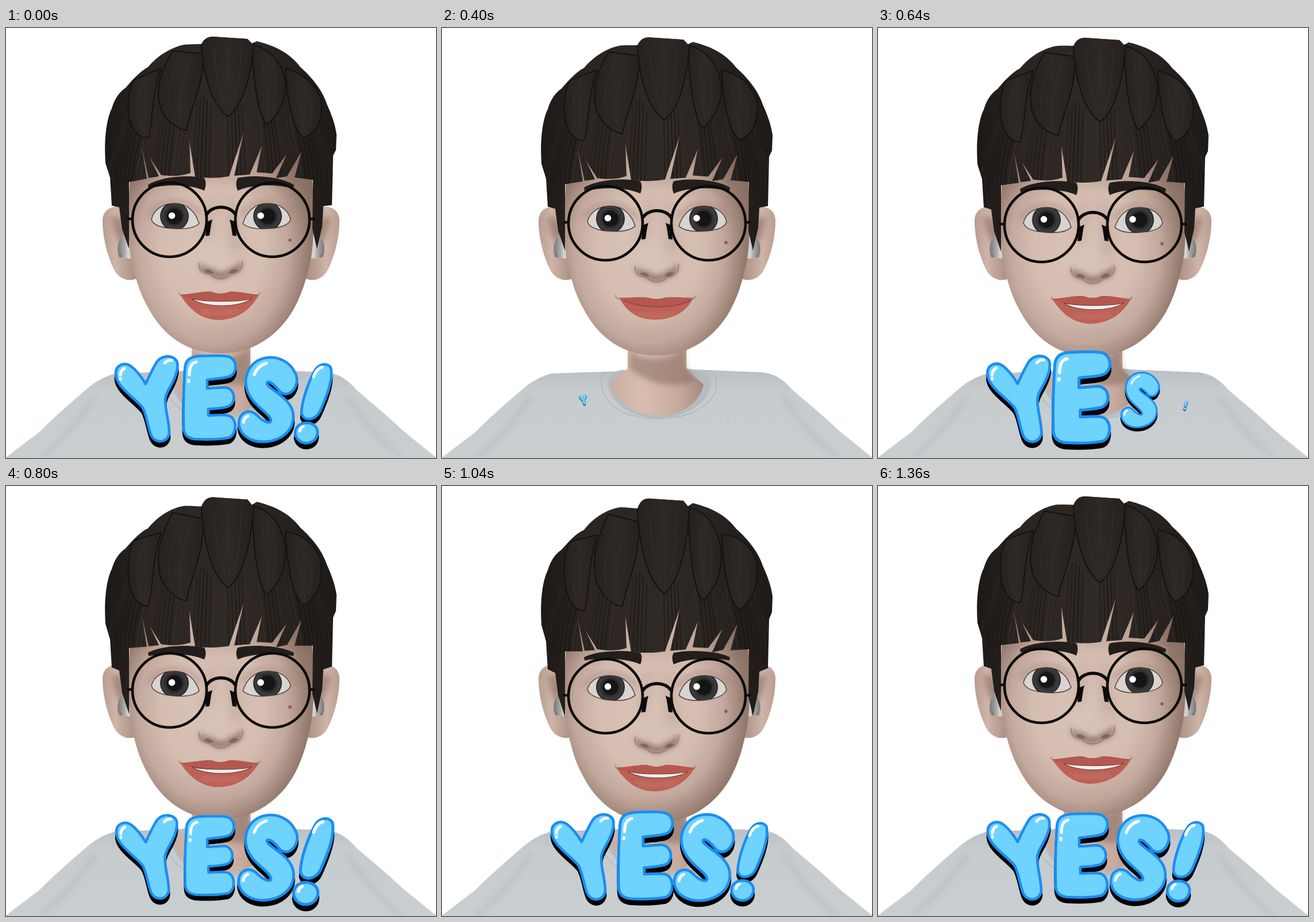
An HTML page that plays this animation: 748 px wide and 748 px high, repeating every 1440 ms.

```html
<!DOCTYPE html>
<html lang="en">
<head>
<meta charset="utf-8">
<title>Yes!</title>
<style>
html, body { margin: 0; width: 100%; height: 100%; overflow: hidden; background: #fff }
svg { display: block; width: 100vw; height: 100vh }
.lock { fill: url(#lockFill); stroke: #15110f; stroke-width: 2; stroke-linejoin: round }
.frame { fill: none; stroke: #0c0b0b; stroke-width: 4.6 }
.letter path { stroke-width: 4.6; stroke-linecap: round; stroke-linejoin: round }
.letter .shine { fill: none; stroke: #fff; stroke-width: 5 }
</style>
</head>
<body>
<svg viewBox="0 0 748 748">
<defs>
  <filter id="soft" x="-50%" y="-50%" width="200%" height="200%"><feGaussianBlur stdDeviation="5"/></filter>
  <filter id="softer" x="-50%" y="-50%" width="200%" height="200%"><feGaussianBlur stdDeviation="10"/></filter>
  <radialGradient id="skin" gradientUnits="userSpaceOnUse" cx="0" cy="0" r="200" gradientTransform="translate(360 385) scale(1 1.250)">
    <stop stop-color="#dac4b8"/><stop offset=".45" stop-color="#d5bdb0"/>
    <stop offset=".65" stop-color="#c3a99d"/><stop offset=".84" stop-color="#94796d"/><stop offset="1" stop-color="#846a5f"/>
  </radialGradient>
  <linearGradient id="earSkin"><stop stop-color="#b89c90"/><stop offset=".35" stop-color="#cfb4a8"/><stop offset="1" stop-color="#a1867a"/></linearGradient>
  <linearGradient id="neckSkin"><stop stop-color="#c9aea2"/><stop offset=".35" stop-color="#d8beb1"/><stop offset=".75" stop-color="#c6a99c"/><stop offset="1" stop-color="#a4887b"/></linearGradient>
  <linearGradient id="cloth" x2="0" y2="1"><stop stop-color="#b9bfc3"/><stop offset=".25" stop-color="#c6cbce"/><stop offset="1" stop-color="#c9ced1"/></linearGradient>
  <linearGradient id="budFill"><stop stop-color="#777"/><stop offset=".4" stop-color="#aaa"/><stop offset=".6" stop-color="#d6d5d2"/><stop offset="1" stop-color="#c0bfbd"/></linearGradient>
  <linearGradient id="hairFill"><stop stop-color="#1d1916"/><stop offset=".2" stop-color="#2b2522"/><stop offset=".55" stop-color="#302a26"/><stop offset="1" stop-color="#1e1a17"/></linearGradient>
  <linearGradient id="lockFill"><stop stop-color="#26211e"/><stop offset=".5" stop-color="#2f2926"/><stop offset="1" stop-color="#26211e"/></linearGradient>
  <radialGradient id="irisFill"><stop offset=".5" stop-color="#151516"/><stop offset=".6" stop-color="#2d2d2f"/><stop offset=".85" stop-color="#3e3e40"/><stop offset="1" stop-color="#232324"/></radialGradient>
</defs>

<g id="body">
  <path fill="url(#cloth)" d="M0 747L58 703C85 676 110 654 138 630C155 615 170 607 190 601L310 597L438 594L558 599C578 602 592 609 610 630C638 654 663 674 690 700L748 747V748H0Z"/>
  <g fill="none" stroke="#8f989e" stroke-width="10" opacity=".18" filter="url(#soft)">
    <path d="M60 748C100 715 130 680 155 640M688 748C648 715 618 680 593 640"/>
  </g>
  <path fill="#b5bbbf" d="M312 595C295 598 287 608 289 622C294 655 335 679 376 679C425 678 465 652 468 618C468 605 455 598 432 593Z"/>
  <path fill="none" stroke="#a9b0b5" stroke-width="1.2" d="M286 600C270 606 276 640 300 660C345 690 440 688 472 640Q482 620 474 603"/>
  <path fill="url(#neckSkin)" d="M323 535V592C318 602 296 606 293 617C297 647 332 674 375 674C424 674 450 647 455 620C446 610 430 603 425 590V535Z"/>
  <path fill="#80665a" opacity=".5" filter="url(#soft)" d="M327 562C350 580 400 582 422 556L424 590L442 612C410 630 355 620 327 592Z"/>
</g>

<g id="side">
  <path fill="url(#earSkin)" d="M204 313C188 307 168 314 168 335C168 368 178 402 190 424C200 438 215 442 229 435L232 350Z"/>
  <path fill="#8d7165" opacity=".6" filter="url(#soft)" d="M184 328C200 326 208 340 210 362L196 372C188 355 184 342 184 328Z"/>
  <path fill="url(#budFill)" d="M211 357C193 362 192 388 197 399L224 402L220 362Z"/>
  <path stroke="#77736f" stroke-width="2" d="M199 393L200 399"/>
</g>
<use href="#side" transform="matrix(-1 0 0 1 748 0)"/>

<g id="head">
  <path fill="url(#skin)" d="M222 180C211 290 211 370 218 403C225 436 233 462 248 488C263 516 285 540 315 554C350 570 398 570 431 554C462 540 486 515 501 488C515 462 523 436 530 403C537 370 538 290 526 180Z"/>
  <g filter="url(#softer)" fill="#8b6c60">
    <path opacity=".22" d="M215 250L535 250L535 274C440 266 300 266 215 274Z"/>
    <path opacity=".3" d="M358 290C348 330 350 345 340 372L356 366L366 300Z"/>
    <path opacity=".35" d="M392 290C400 330 402 350 410 390L394 386L386 300Z"/>
    <path opacity=".3" d="M338 520C360 530 395 530 412 518L400 530L350 532Z"/>
  </g>

  <g id="nose">
    <path filter="url(#soft)" fill="#7c5f54" opacity=".75" d="M336 408C333 424 346 427 356 429C367 440 382 438 391 429C405 427 414 420 410 403C402 418 390 414 384 423C374 426 364 424 358 418C350 416 342 417 336 408Z"/>
    <path fill="none" stroke="#80645a" stroke-width="2" opacity=".5" d="M336 409C334 423 345 427 355 428C366 440 384 438 392 428C405 426 414 418 411 405"/>
    <path fill="#654a41" opacity=".55" d="M344 422C350 418 357 420 361 427C354 427 348 426 344 422ZM387 427C391 419 399 418 404 421C400 426 394 427 387 427Z"/>
  </g>

  <clipPath id="eyeClip"><path id="eye" data-by="blink" d="M253 333C257 315 274 305 294 305C316 305 330 321 336 340C328 348 310 350 293 349C272 348 256 343 253 333Z" data-alt="M253 333C262 341 280 348 296 348C316 348 330 345 336 340C328 348 310 350 293 349C272 348 256 343 253 333Z"/></clipPath>
  <g id="eyeball">
    <path filter="url(#soft)" fill="none" stroke="#a3857a" stroke-width="8" opacity=".5" d="M247 327C258 302 310 285 338 325"/>
    <use href="#eye" fill="#d8d4d1" stroke="#5d4a42" stroke-width="1.6"/>
    <g clip-path="url(#eyeClip)"><g class="iris">
      <circle cx="293" cy="327.500" r="25" fill="url(#irisFill)"/>
    </g></g>
  </g>
  <use href="#eyeball" transform="matrix(-1 0 0 1 748 0)"/>
  <g class="iris" fill="#fff"><circle cx="288.500" cy="326.500" r="5.800"/><circle cx="443" cy="326.500" r="5.800"/></g>

  <path id="brow" fill="#231e1b" d="M247 273C270 258 320 255 345 261Q350 270 345 283C325 273 285 270 248 279Z"/>
  <use href="#brow" transform="matrix(-1 0 0 1 748 0)"/>
  <path fill="#806659" d="M491 369C491 365 497 365 497 369C497 373 491 373 491 369Z"/>

  <g id="mouth">
    <path fill="none" stroke="#94766a" stroke-width="3" opacity=".5" d="M301 460Q303 465 308 467M442 460Q440 465 435 467"/>
    <path fill="#bd6157" data-by="calm" d="M303 464C325 463 345 457 358 459C368 463 378 463 388 459C402 457 420 463 440 464C425 492 400 508 368 508C338 507 318 488 303 464Z" data-alt="M308 465C328 464 345 463 358 464C368 467 378 467 388 464C402 463 420 464 437 465C425 490 402 503 370 503C338 503 322 488 308 465Z"/>
    <path fill="#b45850" data-by="calm" d="M303 464C325 463 345 457 358 459C368 463 378 463 388 459C402 457 420 463 440 464C415 478 330 480 303 464Z" data-alt="M308 465C328 464 345 463 358 464C368 467 378 467 388 464C402 463 420 464 437 465C415 484 330 484 308 465Z"/>
    <path fill="#f1eeea" stroke="#79403a" stroke-width="1.200" data-by="calm" d="M323 471C345 477 405 477 428 471C405 487 345 487 323 471Z" data-alt="M316 469C345 484 405 484 433 469C405 484 345 484 316 469Z"/>
    <path filter="url(#soft)" fill="none" stroke="#d88a7e" stroke-width="5" opacity=".5" d="M338 492Q370 502 405 491"/>
  </g>

  <clipPath id="hairClip"><use href="#hair"/></clipPath>
  <path id="hair" fill="url(#hairFill)" d="M173 235C170 190 176 155 184 140C188 125 196 112 208 104C220 90 235 74 247 68C262 50 285 34 310 29C322 28 332 28 340 28C345 18 352 15 360 15L420 19L428 27L436 23C470 31 495 45 512 68C535 88 552 112 558 132C566 150 572 165 575 185L574 212L569 222L567 308L552 310L550 345L541 384L533 350L534 264L502 260L514 215L489 258L470 261L488 220L463 253L436 251L445 205L424 255L397 257L414 180L388 258C365 262 350 261 329 259L319 196L321 252C305 258 290 258 270 256L250 225L266 258L248 261L236 206L245 262L214 268L214 384L202 350L197 312L184 309L181 260L173 235Z"/>
  <g clip-path="url(#hairClip)">
    <g id="strands" fill="none" stroke-width="2"></g>
    <path class="lock" d="M222 90C208 120 210 160 224 179C232 189 240 192 248 190C256 165 252 120 270 70Z"/>
    <path class="lock" d="M486 70C490 130 500 175 517 190C540 184 552 160 548 125C540 100 520 80 486 70Z"/>
    <path class="lock" d="M290 40C262 85 262 115 269 140C280 165 300 176 314 178C318 145 342 110 344 45Z"/>
    <path class="lock" d="M428 28C430 100 440 152 453 168C475 152 488 125 486 95C480 55 455 35 428 28Z"/>
    <path class="lock" d="M339 24C344 90 360 135 386 154C410 138 426 90 431 25L420 16L352 12Z"/>
    <g fill="none" stroke="#3b342f" stroke-width="2" opacity=".5">
      <path d="M362 35C364 80 372 115 382 138M385 30C388 70 390 110 389 138M408 32C410 75 402 115 394 135"/>
      <path d="M300 58C282 95 280 125 287 148M323 50C304 95 300 130 303 160M446 55C452 95 455 130 456 150M464 62C472 95 470 125 463 145"/>
      <path d="M235 100C225 130 228 155 235 175M505 100C512 140 515 165 520 178M525 112C535 140 533 160 526 175"/>
    </g>
  </g>
</g>

<g id="glasses" class="frame">
  <circle cx="284.500" cy="333.500" r="64.500"/><circle cx="463.500" cy="333.500" r="64.500"/>
  <path d="M211 332H220M528 332H537"/>
  <path stroke-width="5.500" d="M348 326C358 307 390 307 400 326"/>
  <path fill="#0c0b0b" stroke="none" d="M347 338L359 333L357 341L354 361L347 362L349 343ZM401 338L389 333L391 341L394 361L401 362L399 343Z"/>
</g>
<g id="word"></g>
</svg>

<script>
const STEP = 80, STEPS = 18;
const $ = id => document.getElementById(id);

// One value per step: downward nod in px, closed mouth, closed eyes.
const nod  = [0, 3, 5, 6, 6, 6, 1, -6, 9, 33, 22, -6, 10, 32, 15, 0, 8, 14];
const calm = [0, .1, .4, .7, 1, 1, .7, .25];
const blink = { 14: .6, 15: .25 };
const pop = [.12, .65, 1.09, 1.01, .94, .98, 1.02, 1.04];

// Each letter: centre, outline, highlights.
const letters = [
  [245, 647, "M191 602C190 587 205 580 217 588C228 596 235 606 243 619C249 606 255 592 263 580C272 569 289 568 297 579C301 590 296 604 290 616C284 628 277 637 277 648C277 666 284 685 284 704C282 722 259 725 252 707C246 691 245 675 238 661C228 646 191 625 191 602Z",
    "M199 604Q199 596 206 592M276 583Q281 577 288 578M199 610V611"],
  [354, 645, "M311 596C311 579 318 573 333 571C350 570 370 569 384 571C404 574 404 603 386 607C374 610 362 610 350 612L350 627L380 625C400 626 402 655 384 659C373 662 362 662 352 663L352 674C364 674 376 672 386 674C404 678 402 710 386 713C368 716 345 716 328 715C314 713 308 706 309 690C308 660 309 630 311 596Z",
    "M319 603Q319 583 331 581M318 613V615"],
  [457, 648, "M503 600C514 618 494 648 476 632C468 622 458 612 454 617C452 628 500 642 500 676C499 728 412 735 405 690C404 668 424 661 436 673C446 684 460 690 461 683C460 668 418 654 417 616C418 565 484 559 503 600Z",
    "M432 603Q437 588 453 583M413 686Q414 678 421 675"],
  [535, 657, "M536 598C543 584 558 581 565 591C570 612 556 645 546 667C539 682 518 686 514 670C514 650 526 616 536 598ZM503 705C503 680 543 682 542 704C540 728 506 728 503 705Z",
    "M535 607Q540 592 550 590M511 701Q512 695 517 693"]
];

$("word").innerHTML = letters.map(([, , d, shine]) => `<g class="letter">
  <path d="${d}" stroke="#000" transform="translate(0 8.5)"/>
  <path d="${d}" fill="#6fd3ff" stroke="#1b8df2"/>
  <path class="shine" d="${shine}"/></g>`).join("");

// Fine hair strands fanning out toward the fringe.
let strands = "";
for (let x = 178; x < 572; x += 7) {
  const wave = Math.sin(x * 1.7), from = 374 + (x - 374) * .86, top = 140 + 22 * wave;
  strands += `<path stroke="${wave > 0 ? "#413933" : "#12100d"}" opacity="${(.35 + .2 * Math.cos(x)).toFixed(2)}" d="M${from} ${top}C${from} ${top + 40} ${x} 215 ${x} 275"/>`;
}
$("strands").innerHTML = strands;

const profile = [[0, 1.05], [150, 1.05], [260, .92], [330, .72], [430, .9], [485, .77], [565, .6], [800, .6]];

// How strongly a point follows the nod: by height, fading toward the head's rim.
function follow(x, y) {
  const i = profile.findIndex(p => p[0] > y), [y0, a] = profile[i - 1], [y1, b] = profile[i];
  const rim = Math.min(1, Math.hypot((x - 374) / 203, Math.max(0, 235 - y) / 220));
  return (a + (b - a) * (y - y0) / (y1 - y0)) * (1 - .8 * rim ** 4);
}

const numbers = d => d.match(/[\d.]+/g).map(Number);
const parts = [...document.querySelectorAll("#head path")].map(el => {
  const d = el.getAttribute("d");
  return { el, d, base: numbers(d), alt: numbers(el.dataset.alt || d), by: el.dataset.by };
});

function draw(step) {
  const dy = nod[step], pose = { calm: calm[step] || 0, blink: blink[step] || 0 };
  for (const { el, d, base, alt, by } of parts) {
    const mix = pose[by] || 0, p = base.map((v, i) => v + (alt[i] - v) * mix);
    let i = 0;
    el.setAttribute("d", d.replace(/[\d.]+/g, () => {
      const v = p[i], out = i % 2 ? v + dy * follow(p[i - 1], v) : v;
      i++;
      return out.toFixed(2) + " ";
    }));
  }
  document.querySelectorAll(".iris").forEach(g => g.setAttribute("transform", `translate(0 ${dy * .7})`));
  $("glasses").setAttribute("transform", `translate(0 ${dy})`);
  [...$("word").children].forEach((g, i) => {
    const age = step < 4 ? 99 : step - 5 - i, [x, y] = letters[i];
    g.style.display = age < 0 ? "none" : "";
    g.setAttribute("transform", `translate(${x} ${y}) scale(${pop[age] || 1}) translate(${-x} ${-y})`);
  });
}

let shown = -1;
function tick() {
  const step = Math.floor(performance.now() / STEP) % STEPS;
  if (step !== shown) draw(shown = step);
  requestAnimationFrame(tick);
}
tick();
</script>
</body>
</html>
```
